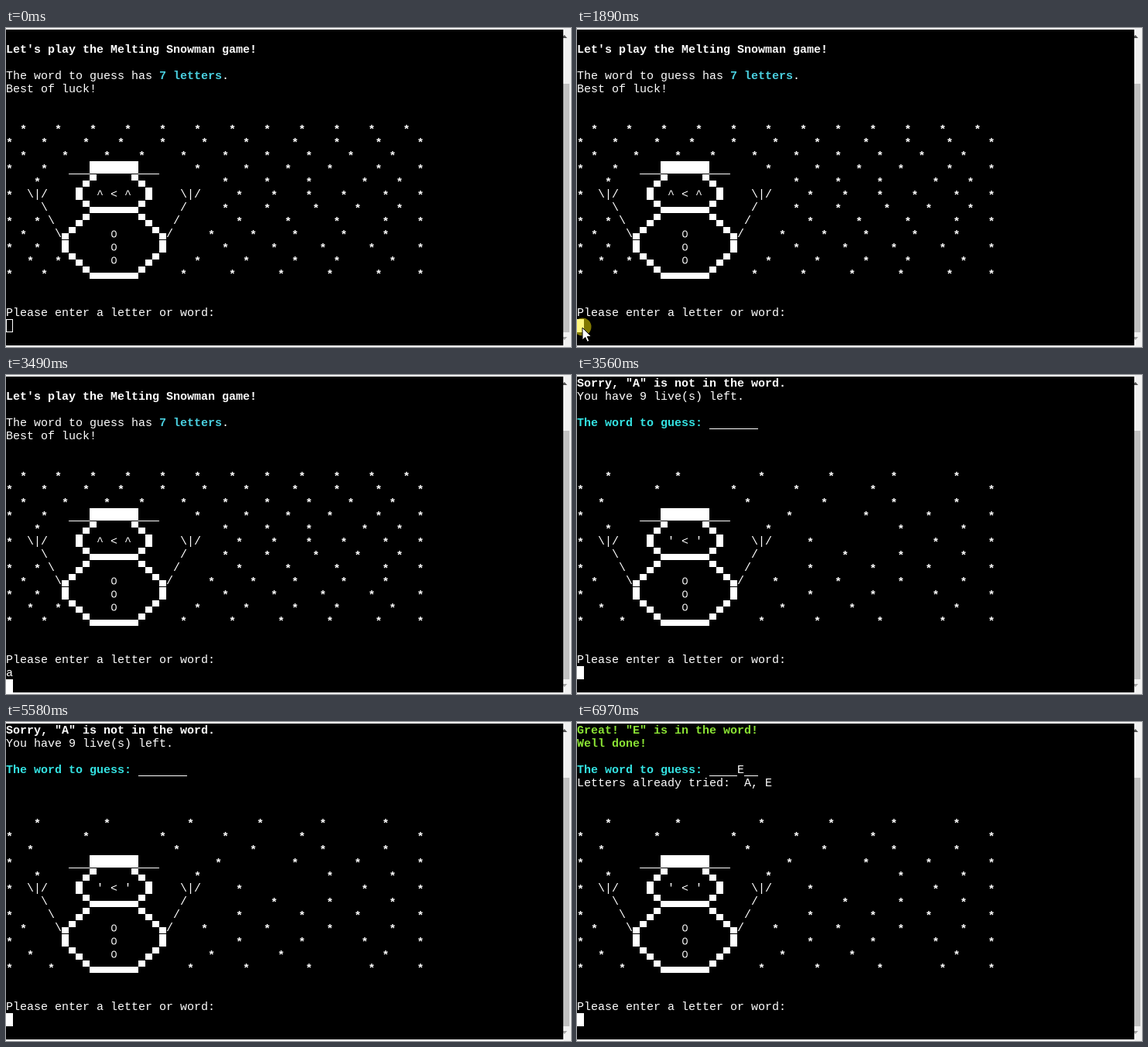
These frames come from a looping animation (730x412 px, 8000 ms). An HTML page with a canvas:

```html
<!DOCTYPE html>
<html lang="en">
<head>
<meta charset="utf-8">
<title>Melting Snowman</title>
<style>
  html, body { margin: 0; width: 100%; height: 100%; overflow: hidden; background: #fff; }
  canvas { display: block; }
</style>
</head>
<body>
<canvas id="stage" width="730" height="412"></canvas>
<script>
const ctx = document.getElementById('stage').getContext('2d', { alpha: false });
const LOOP = 8000, TICK = 200 / 3, CELL = 9, LINE = 17, TOP = 2, PROMPT = 22;
const CLICK = 1890, TYPE_A = 3300, ENTER = 3490, MISS = 3560, TYPE_E = 6310, HIT = 6970;
const WHITE = '#fff', CYAN = '#34e2e2', GREEN = '#8ae234';
const FONT = '15px "Liberation Mono", monospace';

// E marks an eye.
const snowman = [
  '___███████___',
  '▄▀     ▀▄',
  '\\|/    █  E < E  █    \\|/',
  '\\     ▀▄▄▄▄▄▄▄▀     /',
  '\\   ▄▀       ▀▄   /',
  '\\▄▀     0     ▀▄/',
  '█      0      █',
  '▀▄    0    ▄▀',
  '▀▄▄▄▄▄▄▄▀'
];

// @ marks the place of the snowman's line.
const thickSnow = [
  '  *    *    *    *    *    *    *    *    *    *    *    *',
  '*    *     *    *     *     *     *      *     *     *     *',
  '  *     *     *    *     *     *     *     *     *     *',
  '*    *   @     *      *     *     *      *     *',
  '    *      @           *     *     *       *    *',
  '*  @     *    *    *    *     *    *',
  '     @     *     *      *     *     *',
  '*   * @        *      *      *      *    *',
  '  *    @     *     *     *      *     *',
  '*   *   @        *      *      *      *      *',
  '   *   * @     *      *      *     *       *',
  '*    *     @     *      *      *      *      *     *'
];
const thinSnow = [
  '    *         *           *         *        *        *',
  '*          *          *        *          *                *',
  '   *                    *          *         *        *',
  '*        @        *          *        *        *',
  '    *      @       *                  *        *',
  '*  @     *                 *       *',
  '     @            *       *        *',
  '*     @        *        *       *        *',
  '  *    @    *        *        *        *',
  '*       @          *        *        *       *',
  '   *     @       *         *              *',
  '*     *    @      *       *        *        *      *'
];

// Each pass of the pointer across the stage: [time, x, y] key points
const passes = [
  [[330, 187, 407], [460, 52, 403], [530, 52, 403]],
  [[930, 0, 381], [1130, 25, 388], [1330, 25, 388], [1680, 7, 387],
   [1940, 7, 387], [2220, 98, 406], [2420, 98, 409]],
  [[4220, 193, 403], [4360, 440, 388], [4420, 557, 404], [4700, 608, 409]],
  [[5380, 622, 333], [5510, 598, 383], [5580, 598, 383]]
];

const within = (t, start, end) => t >= start && t < end;

function box(x, y, w, h, color = WHITE) {
  ctx.fillStyle = color;
  ctx.fillRect(x, y, w, h);
}

function polygon(color, points) {
  ctx.fillStyle = color;
  ctx.beginPath();
  points.forEach(p => ctx.lineTo(...p));
  ctx.closePath();
  ctx.fill();
}

function glyph(ch, x, y) {
  if (ch === '█') ctx.fillRect(x, y, CELL, 16);
  else if (ch === '▀') ctx.fillRect(x, y, CELL, 8);
  else if (ch === '▄') ctx.fillRect(x, y + 8, CELL, 8);
  else if (ch === '_') ctx.fillRect(x, y + 16, CELL, 1);
  else if (ch === '0') {
    ctx.beginPath();
    ctx.ellipse(x + 4.5, y + 9, 2.8, 4, 0, 0, 7);
    ctx.stroke();
  } else ctx.fillText(ch, x, y + (ch === '*' ? 15 : 13));
}

function print(text, col, row, color = WHITE, bold = false) {
  ctx.fillStyle = color;
  ctx.strokeStyle = WHITE;
  ctx.lineWidth = 1.2;
  [...text].forEach((ch, i) => {
    ctx.font = (bold || ch === '*' ? 'bold ' : '') + FONT;
    glyph(ch, (col + i) * CELL, TOP + row * LINE);
  });
}

function scrollbar() {
  box(720, 0, 10, 412, '#f1f1f1');
  box(720, 72, 8, 321, '#c1c1c1');
  polygon('#505050', [[718, 13], [721.5, 9], [725, 13]]);
  polygon('#a3a3a3', [[718, 399], [721.5, 403], [725, 399]]);
}

function header(t) {
  if (t < MISS) {
    print("Let's play the Melting Snowman game!", 0, 1, WHITE, true);
    print('The word to guess has          .', 0, 3);
    print('7 letters', 22, 3, '#4ad0e0', true);
    print('Best of luck!', 0, 4);
    return;
  }
  const hit = t >= HIT;
  if (hit) {
    print('Great! "E" is in the word!', 0, 0, GREEN, true);
    print('Well done!', 0, 1, GREEN, true);
    print('Letters already tried:  A, E', 0, 4);
  } else {
    print('Sorry, "A" is not in the word.', 0, 0, WHITE, true);
    print('You have 9 live(s) left.', 0, 1);
  }
  print('The word to guess:', 0, 3, CYAN, true);
  print(hit ? '____E__' : '_______', 19, 3);
}

function scene(t) {
  const [snow, eye] = t < MISS ? [thickSnow, '^'] : [thinSnow, "'"];
  snow.forEach((line, i) =>
    print(line.replace('@', snowman[i - 3]).replace(/E/g, eye), 0, 7 + i));
}

function prompt(t) {
  print('Please enter a letter or word:', 0, PROMPT - 1);
  const typed = within(t, TYPE_A, MISS) ? 'a' : within(t, TYPE_E, HIT) ? 'e' : '';
  const entered = within(t, ENTER, MISS);
  print(typed, 0, PROMPT);
  const x = entered ? 0 : typed.length * CELL;
  const y = TOP + (PROMPT + entered) * LINE;
  box(x, y, CELL, LINE);
  if (t < CLICK) box(x + 1, y + 1, CELL - 2, LINE - 2, '#000');
}

function pointer(t) {
  if (within(t, CLICK, CLICK + 50)) {
    ctx.fillStyle = 'rgba(255, 240, 0, .5)';
    ctx.beginPath();
    ctx.arc(7, 386, 11.5, 0, 7);
    ctx.fill();
  }
  const keys = passes.find(p => within(t, p[0][0], p.at(-1)[0]));
  if (!keys) return;
  // The pointer moves in ticks, counted from its arrival.
  const start = keys[0][0];
  const held = start + Math.floor((t - start) / TICK + .1) * TICK;
  const next = Math.max(1, keys.findIndex(k => k[0] >= held));
  const [t0, x0, y0] = keys[next - 1], [t1, x1, y1] = keys[next];
  const k = (held - t0) / (t1 - t0);
  ctx.save();
  ctx.translate(Math.round(x0 + (x1 - x0) * k), Math.round(y0 + (y1 - y0) * k));
  ctx.strokeStyle = '#000';
  ctx.lineWidth = 1;
  polygon(WHITE, [[0, 0], [0, 16], [3.7, 12.6], [6.3, 18.3], [8.8, 17.2], [6.3, 11.6], [11.5, 11.6]]);
  ctx.stroke();
  ctx.restore();
}

function draw(now) {
  const t = now % LOOP;
  box(0, 0, 730, 412);
  scrollbar();
  box(0, 2, 720, 408, '#000');
  header(t);
  scene(t);
  prompt(t);
  pointer(t);
  requestAnimationFrame(draw);
}
draw(0);
</script>
</body>
</html>
```
